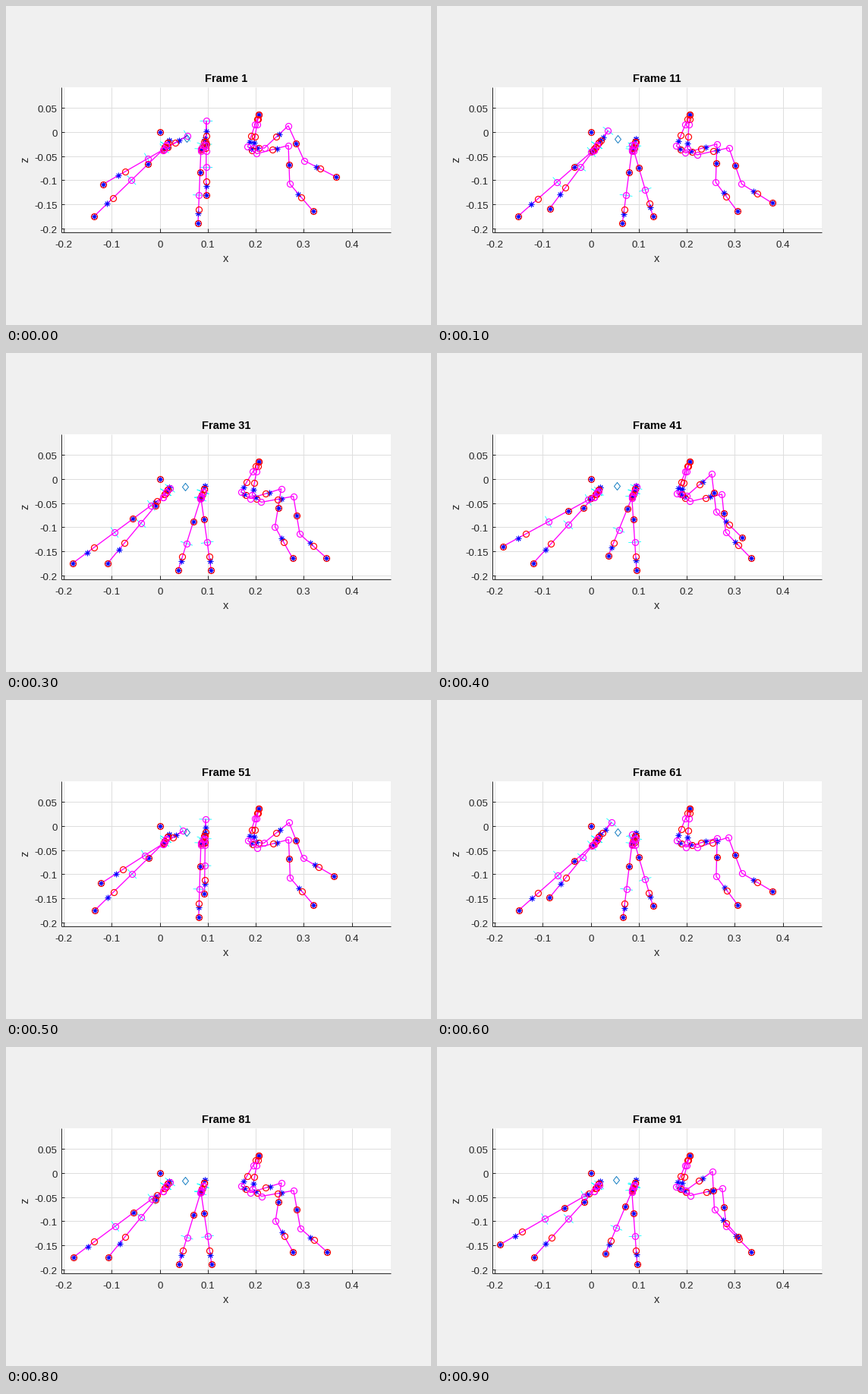
A matplotlib script that plays this animation: 560 by 420 pixels, repeating every 1 s.

```python
from math import atan2, cos, hypot, pi, radians, sin

import numpy as np
import matplotlib.pyplot as plt
from matplotlib.animation import FuncAnimation

W, H, DPI = 560, 420, 100
PX = 72 / DPI
FRAMES, INTERVAL = 10, 100
X0, Y0, SCALE = 203, 166.6, 632.5  # pixel place of the data zero, pixels per unit
LEFT, RIGHT, TOP, BOTTOM = 73, 507, 107, 298
INK, MAGENTA = "#262626", "#ff00ff"

PERIOD = 5.1  # steps per gait cycle
NEAR, FAR = (3.5, 1.45), (4.35, 2.05)  # start and length of the swing, in steps
SHOULDER = np.array([333.8, 143])
UPPER, MIDDLE, LOWER, BEND = 43, 50.5, 47.3, radians(38.5)  # front leg


def lerp(a, b, t):
    return a + (b - a) * t


def late_ease(s):
    return s - .3 * sin(2 * pi * s)


def early_ease(s):
    return sin(pi * s / 2) + .4 * sin(pi * s)


def foot_path(step, swing, back, front, height, ease):
    """Foot x and lift: a steady slide back, then a swing through the air."""
    start, length = swing
    t = (step - start) % PERIOD
    if t < length:
        s = t / length
        return lerp(back, front, ease(s)), height * sin(pi * s) ** 2
    return lerp(front, back, (t - length) / (PERIOD - length)), 0


def straight_leg(step, swing, back, front, height, hip, pivot, ground,
                 shin, reach, twist=0):
    """Knee and ankle lie on the line from the foot through the pivot."""
    x, lift = foot_path(step, swing, back, front, height, late_ease)
    hip, foot = np.array(hip), np.array([x, ground - lift])
    pivot = np.array([pivot[0] + twist * lift * (x - 226), pivot[1]])
    toward = (pivot - foot) / hypot(*(pivot - foot))
    return np.array([hip, (hip + pivot) / 2, pivot,
                     foot + reach * toward, foot + shin * toward, foot])


def polar(length, angle):
    return length * np.array([cos(angle), sin(angle)])


def front_leg(step, swing, back, front, height):
    """Two-link reach from coxa to foot; the ankle keeps a fixed bend."""
    x, lift = foot_path(step, swing, back, front, height, early_ease)
    foot = np.array([x, 270.5 - lift])
    coxa = np.array([325 + .33 * (x - 387), 193 + .11 * (x - 387) - .24 * lift])
    hook = hypot(MIDDLE + LOWER * cos(BEND), LOWER * sin(BEND))
    dx, dy = foot - coxa
    span = hypot(dx, dy)
    turn = np.arccos((UPPER**2 + span**2 - hook**2) / (2 * UPPER * span))
    knee = coxa + polar(UPPER, atan2(dy, dx) - turn)
    dx, dy = foot - knee
    ankle = knee + polar(MIDDLE, atan2(dy, dx)
                         + atan2(LOWER * sin(BEND), MIDDLE + LOWER * cos(BEND)))
    inner = coxa[0] - 12 - .06 * lift
    return np.array([SHOULDER, (327.5 + .32 * (inner - 315), 156.5),
                     (inner, 184.5 + (inner - 314) / 4), coxa, knee, ankle, foot])


def all_legs(step):
    hind = dict(hip=(215, 177.5), pivot=(207, 190), ground=277, shin=68, reach=128)
    mid = dict(hip=(262.8, 175.5), pivot=(257.3, 191), ground=286.5, shin=37,
               reach=98, twist=.005)
    return [straight_leg(step, NEAR, 84, 118.4, 28, **hind),
            straight_leg(step, FAR, 125, 147, 50, **hind),
            straight_leg(step, NEAR, 223, 254.8, 24, **mid),
            straight_leg(step, FAR, 261, 283.2, 44, **mid),
            front_leg(step, NEAR, 373.5, 406.4, 35),
            front_leg(step, FAR, 411, 438, 54)]


def cross_tick(joint, after, size=8):
    """Short line through a joint, square to the next segment."""
    dx, dy = after - joint
    normal = np.array([-dy, dx]) / max(hypot(dx, dy), 1e-6) * size
    return [joint - normal, joint + normal, (np.nan, np.nan)]


def build(step):
    """Collect line, tick and marker places for all legs."""
    line, ticks, rings = [], [], []
    reds, stars = [(X0, Y0)], [(X0, Y0)]
    for chain in all_legs(step):
        is_front = len(chain) == 7
        line += [*chain, (np.nan, np.nan)]
        rings += list(chain[1:-1])
        reds += [lerp(a, b, .5) for a, b in zip(chain, chain[1:])] + [chain[-1]]
        if is_front:
            reds.append(chain[0])
        fractions = [.78, .35, .63, .5, .38] if is_front else [.66, .5, .66]
        first = 1 if is_front else 2
        stars += [chain[0], chain[-1]]
        stars += [lerp(a, b, t) for a, b, t
                  in zip(chain[first:], chain[first + 1:], fractions)]
        if not is_front:
            for i in (1, 3, 4):
                ticks += cross_tick(chain[i], chain[i + 1])
    return line, ticks, rings, reds, stars


fig = plt.figure(figsize=(W / DPI, H / DPI), dpi=DPI, facecolor="#f0f0f0")
ax = fig.add_axes([0, 0, 1, 1])
ax.set(xlim=(.5, W + .5), ylim=(H + .5, .5))  # whole numbers are pixel centres
ax.axis("off")
ax.add_patch(plt.Rectangle((LEFT, TOP), RIGHT - LEFT, BOTTOM - TOP, fc="white",
                           ec="none", zorder=0))


def rule(xs, ys, color, z):
    ax.plot(xs, ys, color=color, lw=PX, zorder=z, solid_capstyle="butt")


def label(x, y, text, px, **style):
    style = {"color": INK, "ha": "center", "va": "baseline", **style}
    return ax.text(x, y, text, fontsize=px * PX, family="Liberation Sans", **style)


for k in range(-2, 5):
    x = np.floor(X0 + SCALE * k / 10)
    rule([x, x], [TOP, BOTTOM], "#dedede", 1)
    rule([x, x], [BOTTOM, BOTTOM - 4.5], INK, 2)
    label(x + .5, 318.8, f"{k / 10:g}", 13.33)
for k in range(-4, 2):
    y = np.floor(Y0 - SCALE * k / 20)
    rule([LEFT, RIGHT], [y, y], "#dedede", 1)
    rule([LEFT, LEFT + 4.5], [y, y], INK, 2)
    label(68, y + 6.5, f"{k / 20:g}", 13.33, ha="right")
rule([LEFT, LEFT], [TOP, BOTTOM + .5], INK, 2)
rule([LEFT, RIGHT], [BOTTOM, BOTTOM], INK, 2)
label(290.5, 337.5, "x", 14.67)
label(26, 202.5, "z", 14.67, rotation=90, va="center")
title = label(290.5, 100.8, "", 14.67, color="black", weight="bold")


def layer(z, **style):
    return ax.plot([], [], zorder=z, **style)[0]


def markers(z, marker, color, size=8, width=1.2):
    return layer(z, ls="none", marker=marker, mfc="none", mec=color,
                 ms=size * PX, mew=width * PX)


layers = [layer(4, color=MAGENTA, lw=1.33 * PX),
          layer(3, color="cyan", lw=.8 * PX),
          markers(7, "o", MAGENTA), markers(6, "o", "red"),
          markers(5, (8, 2, 0), "blue", 7.6, .9)]
diamond = markers(7, [(0, 1), (.8, 0), (0, -1), (-.8, 0), (0, 1)], "#0072bd", 10, .9)


def update(n):
    for artist, points in zip(layers, build(n)):
        artist.set_data(*np.array(points, float).T)
    turn = 2 * pi / PERIOD
    diamond.set_data([237.6 + 1.1 * cos(turn * (n - .6))],
                     [175.6 - 1.5 * cos(turn * n)])
    title.set_text(f"Frame {10 * n + 1}")
    return [*layers, diamond, title]


anim = FuncAnimation(fig, update, frames=FRAMES, interval=INTERVAL, repeat=True,
                     repeat_delay=0)
plt.show()
```
